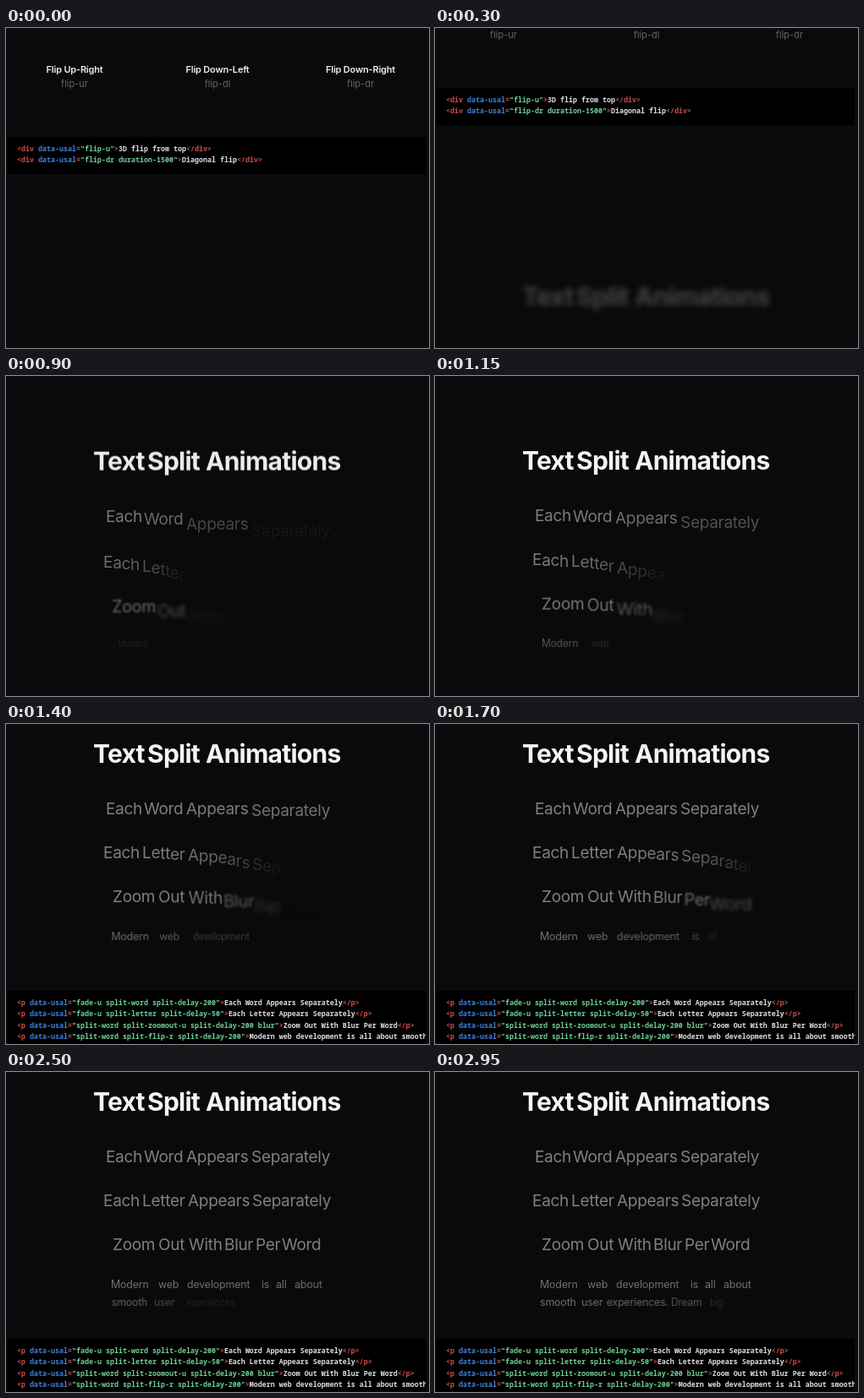
These frames come from a looping animation (500 by 379 pixels, 3 s). An HTML page:

```html
<!DOCTYPE html>
<html lang="en">
<head>
<meta charset="utf-8">
<title>Text split animations</title>
<style>
html, body { margin: 0; width: 100%; height: 100%; overflow: hidden; background: #0a0a0c; }
#stage { position: relative; width: 500px; height: 379px; overflow: hidden; background: #0a0a0c; font-family: Inter, "Open Sans", sans-serif; }
#page { position: absolute; left: 0; top: 0; width: 500px; height: 740px; }
.word { position: absolute; white-space: pre; }
.word i { display: inline-block; font-style: normal; }
.title { font-size: 30px; font-weight: 700; letter-spacing: -.75px; line-height: 40px; margin-top: -20px; color: #f4f4f4; }
.row { font-size: 19px; letter-spacing: -.3px; line-height: 26px; margin-top: -13px; color: #808080; }
.small { font-size: 12.4px; letter-spacing: -.15px; line-height: 20px; margin-top: -10px; color: #707070; }
.card { position: absolute; top: 41px; width: 160px; margin-left: -80px; text-align: center; font-size: 11px; line-height: 17px; color: #666; }
.card b { display: block; font-weight: 600; letter-spacing: -.2px; color: #eee; }
.code { position: absolute; left: 2px; width: 494px; box-sizing: border-box; margin: 0; padding: 6.5px 0 0 11px; overflow: hidden; background: #000; color: #dedede; font: 600 8.33px/13.6px "Noto Sans Mono", "DejaVu Sans Mono", monospace; white-space: pre; }
.tag { color: #cc4c4c; }
.attr { color: #3f80dc; }
.str { color: #70d096; }
</style>
</head>
<body>
<div id="stage"><div id="page"></div></div>
<script>
const LOOP = 3000, STEP = 50, SPLIT = 1000;
const page = document.getElementById('page');
const anims = [];

function add(parent, tag, cls, text) {
  const el = document.createElement(tag);
  el.className = cls;
  el.textContent = text;
  parent.appendChild(el);
  return el;
}

function play(el, frames, options) {
  const a = el.animate(frames, { fill: 'both', ...options });
  a.pause();
  anims.push(a);
}

function reveal(el, from, start) {
  const to = { opacity: 1, transform: 'none' };
  if (from.filter) to.filter = 'blur(0px)';
  play(el, [{ opacity: 0, ...from }, to], { delay: start, duration: SPLIT, easing: 'ease' });
}

const rise = { transform: 'translateY(20px)' };
const riseBlur = { transform: 'translateY(20px)', filter: 'blur(5px)' };
const zoomOut = { transform: 'translateY(20px) scale(1.2)', filter: 'blur(5px)' };
const flip = { transform: 'perspective(300px) translateX(4px) rotateY(-45deg)' };

// Places words at their left edges; delay is the gap between words, or letters if byLetter.
function line(cls, y, text, lefts, from, start, delay, byLetter) {
  let n = 0;
  text.split(' ').forEach((w, k) => {
    const el = add(page, 'div', 'word ' + cls, byLetter ? '' : w);
    el.style.left = lefts[k] + 'px';
    el.style.top = y + 'px';
    const parts = byLetter ? [...w].map(c => add(el, 'i', '', c)) : [el];
    parts.forEach(p => reveal(p, from, start + delay * n++));
  });
}

function card(x, name, id) {
  const el = add(page, 'div', 'card', '');
  el.style.left = x + 'px';
  add(el, 'b', '', name);
  add(el, 'span', '', id);
}

function code(top, height, tag, rows) {
  const el = add(page, 'pre', 'code', '');
  el.style.top = top + 'px';
  el.style.height = height + 'px';
  rows.forEach(([value, text]) => {
    add(el, 'span', 'tag', '<' + tag + ' ');
    add(el, 'span', 'attr', 'data-usal');
    add(el, 'span', 'tag', '=');
    add(el, 'span', 'str', '"' + value + '"');
    add(el, 'span', 'tag', '>');
    add(el, 'span', '', text);
    add(el, 'span', 'tag', '</' + tag + '>\n');
  });
}

card(81, 'Flip Up-Right', 'flip-ur');
card(250, 'Flip Down-Left', 'flip-dl');
card(419, 'Flip Down-Right', 'flip-dr');

code(129, 44, 'div', [
  ['flip-u', '3D flip from top'],
  ['flip-dr duration-1500', 'Diagonal flip']
]);

line('title', 361, 'Text Split Animations', [103, 167, 236], riseBlur, 120, 0);
line('row', 427, 'Each Word Appears Separately', [118, 163, 213, 290], rise, 200, 200);
line('row', 479, 'Each Letter Appears Separately', [115, 161, 215, 291], rise, 350, 50, true);
line('row', 531, 'Zoom Out With Blur Per Word', [126, 180, 216, 258, 295, 326], zoomOut, 370, 200);
line('small', 578, 'Modern web development is all about', [124, 180, 214, 302, 319, 341], flip, 750, 200);
line('small', 599, 'smooth user experiences. Dream big', [124, 173, 202, 277, 321], flip, 1950, 200);

code(642, 80, 'p', [
  ['fade-u split-word split-delay-200', 'Each Word Appears Separately'],
  ['fade-u split-letter split-delay-50', 'Each Letter Appears Separately'],
  ['split-word split-zoomout-u split-delay-200 blur', 'Zoom Out With Blur Per Word'],
  ['split-word split-flip-r split-delay-200', 'Modern web development is all about smooth user experiences. Dream big']
]);

// Scroll stops: time, offset, easing towards the next stop.
const stops = [
  [0, 0, 'linear'],
  [50, 0, 'cubic-bezier(.4,.1,.7,.7)'],
  [500, 130, 'cubic-bezier(.3,.3,.6,.95)'],
  [900, 261, 'linear'],
  [1150, 261, 'ease-in-out'],
  [1400, 326, 'linear'],
  [LOOP, 326, 'linear']
];
play(page, stops.map(([t, y, easing]) => ({
  offset: t / LOOP, transform: `translateY(${-y}px)`, easing
})), { duration: LOOP });

const begin = performance.now();
function draw() {
  const t = (performance.now() - begin) % LOOP;
  const now = Math.floor(t / STEP) * STEP;
  anims.forEach(a => { a.currentTime = now; });
  requestAnimationFrame(draw);
}
draw();
</script>
</body>
</html>
```
